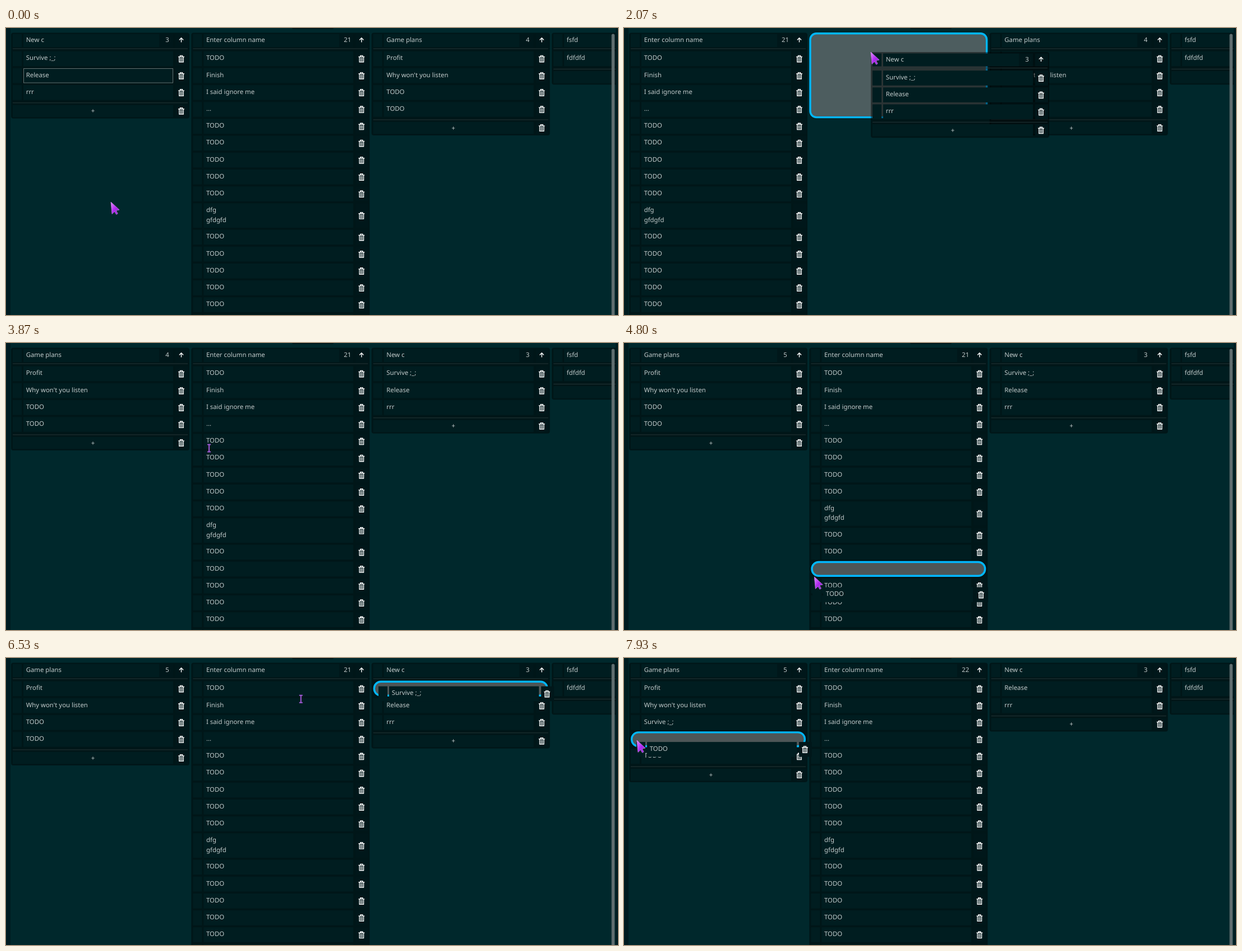
An HTML page for the animation above (8000 ms loop, 1091 by 513 pixels).

```html
<!DOCTYPE html>
<html lang="en">
<head>
<meta charset="utf-8">
<title>Board</title>
<style>
html, body { margin: 0; width: 100%; height: 100%; overflow: hidden; background: #00282c; }
svg { display: block; width: 100%; height: 100%; }
text {
  font: 11.36px "Noto Sans", "Open Sans", sans-serif;
  fill: #c3cbcb;
  text-rendering: geometricPrecision;
  white-space: pre;
}
.mid { text-anchor: middle; }
.panel { fill: rgba(0, 0, 0, .45); }
.cell { fill: #001d20; }
.dark { fill: #00171a; }
.edge { fill: #001c20; }
.line { fill: #263537; }
.hold { fill: rgba(128, 128, 128, .6); stroke: #00b8ff; stroke-width: 3.4; }
.icon { fill: none; stroke: #fff; stroke-width: 1.4; }
</style>
</head>
<body>
<svg id="stage" viewBox="0 0 1091 513" preserveAspectRatio="none">
  <defs>
    <g id="trash" class="icon">
      <path d="M-5.4 -3.7H5.4M-2 -4V-5.8H2V-4M-3.7 -3.5V5.6H3.7V-3.5"/>
      <path d="M-1.2 -2V4.6M1.2 -2V4.6" stroke-width="1.2"/>
    </g>
    <path id="up" class="icon" d="M0 4.4V-3.4M-3.6 .3L0 -3.4L3.6 .3" stroke-width="1.8"/>
    <linearGradient id="glow" x2="1" y2="1">
      <stop stop-color="#e58cff"/><stop offset=".5" stop-color="#b02cf0"/><stop offset="1" stop-color="#8a1fd0"/>
    </linearGradient>
    <path id="arrow" fill="url(#glow)" stroke="#d58cf5" stroke-width=".7" stroke-linejoin="round"
      d="M0 0L15 14L9.3 15.2L12.2 20.8L9.6 22.3L6.6 17L2 21.5Z"/>
    <path id="beam" fill="none" stroke="#a259d6" stroke-width="2" d="M-3 -6.5H3M-3 6.5H3M0 -6.5V6.5"/>
    <path id="move" fill="#fff" stroke="#111" paint-order="stroke"
      d="M0 -8.5L3.5 -4.5H1V-1H4.5V-3.5L8.5 0L4.5 3.5V1H1V4.5H3.5L0 8.5L-3.5 4.5H-1V1H-4.5V3.5L-8.5 0L-4.5 -3.5V-1H-1V-4.5H-3.5Z"/>
  </defs>
  <g id="board"></g>
  <rect class="edge" width="8" height="513"/>
  <rect class="edge" x="1087" width="4" height="513"/>
  <rect class="dark" x="510" y="-4" width="74" height="6" rx="2"/>
  <rect x="1079.5" y="10.5" width="5.5" height="520" rx="2.7" fill="#5f6d6f"/>
  <g id="top"></g>
</svg>
<script>
const LOOP = 8000, FPS = 15, PITCH = 30.2, TOP = 8.5, HEAD = 32.5, TALL = 'dfg\ngfdgfd';
const board = document.getElementById('board');
const overlay = document.getElementById('top');

// Board contents; '*' is the drop slot
const todo = n => Array(n).fill('TODO');
const put = (list, i, v = '*') => [...list.slice(0, i), v, ...list.slice(i)];
const enter = (n, ...next) =>
  ['TODO', 'Finish', 'I said ignore me', '...', ...todo(n), TALL, ...next, ...todo(6)];
const game = ['Profit', "Why won't you listen", ...todo(2)];
const rest = ['Release', 'rrr'];
const kept = put(game, 2, 'Survive ;_;');
const names = { N: 'New c', E: 'Enter column name', G: 'Game plans', F: 'fsfd' };

// Storyboard: each scene changes only what it names
const scenes = [
  { t: 0, order: 'NEGF', N: put(rest, 0, 'Survive ;_;'), E: enter(5), G: game, F: ['fdfdfd'],
    nN: 3, nE: 21, nG: 4, nF: 1, col: '', card: '', focus: true },
  { t: 1330, focus: false },
  { t: 1470, col: 'N' },
  { t: 1670, order: 'ENGF' },
  { t: 2130, col: '' },
  { t: 2730, col: 'G' },
  { t: 2800, order: 'EGNF' },
  { t: 2930, order: 'GENF' },
  { t: 3270, col: '' },
  { t: 4130, card: 'TODO', E: put(enter(4), 4) },
  { t: 4330, E: enter(4), G: put(game, 3), nG: 5 },
  { t: 4600, E: enter(4, 'TODO', 'TODO', '*'), G: game },
  { t: 4870, E: enter(4, '*') },
  { t: 5330, E: put(enter(4), 8) },
  { t: 5800, E: enter(5), card: '' },
  { t: 6400, N: put(rest, 0), card: 'Survive ;_;' },
  { t: 6600, N: rest, E: put(enter(5), 3), nE: 22 },
  { t: 6800, E: enter(5), G: put(game, 2) },
  { t: 7130, G: kept, card: '' },
  { t: 7870, G: put(kept.slice(0, 3), 3).concat('TODO'), card: 'TODO' }
];

// Pointer trips: leave, arrive, x, y
const trips = [
  [0, 70, 187, 294], [330, 530, 204, 291], [600, 1400, 18, 21], [1432, 1727, 440, 43],
  [2070, 2530, 660, 27], [2677, 3128, 187, 17], [3270, 3870, 362, 188], [3870, 4070, 342, 184],
  [4130, 4370, 60, 150], [4430, 4770, 340, 440], [4770, 4930, 338, 375], [5070, 5530, 337, 298],
  [5870, 6330, 664, 50], [6470, 6930, 97, 145], [7070, 7330, 28, 155], [7470, 7600, 35, 156],
  [7730, 7870, 22, 149.5], [7870, 7930, 23, 147]
];

function pointer(t) {
  let x = 187, y = 311;
  for (const [from, to, tx, ty] of trips) {
    if (t <= from) break;
    const left = 1 - Math.min(1, (t - from) / (to - from));
    const k = 1 - left * left;
    x += (tx - x) * k;
    y += (ty - y) * k;
  }
  return [x, y];
}

const box = (cls, x, y, w, h, r = 0) =>
  `<rect class="${cls}" x="${x}" y="${y}" width="${w}" height="${h}" rx="${r}"/>`;
const label = (x, y, s, cls = '') => `<text class="${cls}" x="${x}" y="${y}">${s}</text>`;
const use = (id, x, y) => `<use href="#${id}" x="${x}" y="${y}"/>`;
const slot = (x, y, w, h, r) => box('hold', x + 1.7, y + 1.3, w - 3.4, h - 3.4, r);
const colX = i => 9 + 321.3 * i;
const pitch = s => s === TALL ? PITCH + 17 : PITCH;
const colHeight = list => 62.6 + list.reduce((sum, s) => sum + pitch(s), 0);

function card(x, y, s) {
  if (s === '*') return slot(x, y, 312, 28.2, 12);
  const h = pitch(s) - 3.6, top = y + .6;
  return box('cell', x, top, 16, h) + box('cell', x + 19, top, 267, h) + box('dark', x + 290, top, 23, h) +
    s.split('\n').map((line, i) => label(x + 23.7, y + 16.4 + i * 17.4, line)).join('') +
    use('trash', x + 300.5, y - .9 + pitch(s) / 2);
}

function column(x, y, key, s) {
  const list = s[key], L = x + 3;
  let out = box('panel', x, y, 318, colHeight(list), 4) +
    box('cell', L, y + 2.5, 16, 23) + box('cell', L + 19, y + 2.5, 242, 23) +
    box('dark', L + 261, y + 2.5, 25, 23) + box('dark', L + 290, y + 2.5, 23, 23) +
    label(L + 23.7, y + 16.9, names[key]) + label(L + 275.5, y + 16.9, s['n' + key], 'mid') +
    use('up', L + 300.5, y + 12.6) + box('line', L, y + 28, 312, 1);
  let cy = y + HEAD;
  for (const item of list) {
    out += card(L, cy, item);
    cy += pitch(item);
  }
  return out + box('line', L, cy + 1.7, 312, 1) + box('cell', L, cy + 6, 286, 21.5) +
    box('dark', L + 290, cy + 6, 23, 21.5) + label(L + 143, cy + 20.8, '+', 'mid') +
    use('trash', L + 300.5, cy + 16.8);
}

// Arrow over slots and gaps, cross over handles, beam over text
function pointerShape(x, y, ghostGap, s) {
  const i = Math.floor((x - 9) / 321.3), key = s.order[i];
  if (!key || key === s.col || y > TOP + colHeight(s[key])) return 'arrow';
  let cy = TOP + HEAD;
  const under = s[key].find(item => y < (cy += pitch(item)));
  if (under === '*' && y > TOP + HEAD) return 'arrow';
  const u = x - colX(i) - 3;
  if (u < 16 || (s.col || s.card) && ghostGap < 16) return 'move';
  return u < 286 ? 'beam' : 'arrow';
}

function draw(k) {
  const at = n => Math.round(n * 100 / FPS) * 10;
  const t = at(k);
  const s = Object.assign({}, ...scenes.filter(c => c.t <= t));
  let out = '';
  [...s.order].forEach((key, i) => {
    out += key === s.col ? slot(colX(i), TOP, 318, colHeight(s[key]), 11) : column(colX(i), TOP, key, s);
  });
  if (s.focus) {
    out += '<rect x="31.5" y="72.5" width="266" height="25.5" fill="none" stroke="#657070"/>';
    if ((t + 530) % 1000 < 500) out += '<rect x="77" y="76.5" width="1" height="15" fill="#c3cbcb"/>';
  }
  board.innerHTML = out;

  // The dragged piece trails the pointer by one tick
  const [dx, dy] = pointer(at(Math.max(0, k - 1)));
  const [px, py] = pointer(t);
  const shape = pointerShape(px, py, Math.hypot(px - dx, py - dy), s);
  overlay.innerHTML = (s.col ? column(dx, dy, s.col, s) : s.card ? card(dx, dy, s.card) : '') +
    use(shape, px, py);
}

let last = -1;
const start = performance.now();
function tick() {
  const t = (performance.now() - start) % LOOP;
  const k = Math.floor((t + 4) * FPS / 1000) % (LOOP * FPS / 1000);
  if (k !== last) draw(last = k);
  requestAnimationFrame(tick);
}
tick();
</script>
</body>
</html>
```
